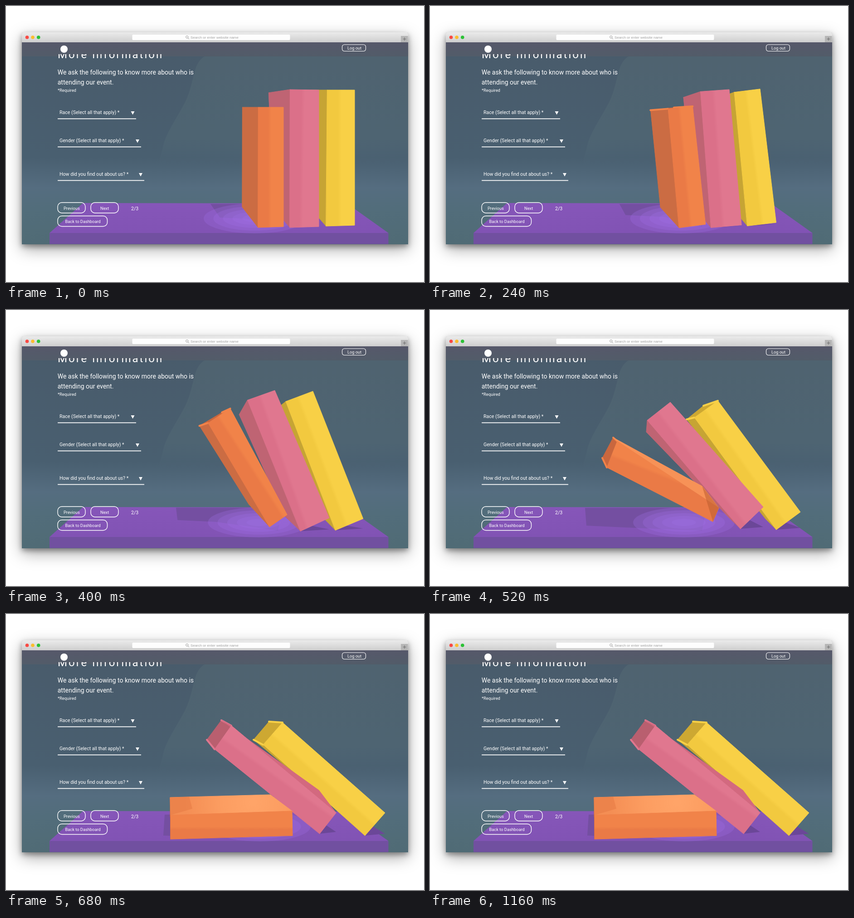
An HTML page with a canvas for the animation above (1.2 s loop, 922 by 608 pixels).

```html
<!DOCTYPE html>
<html lang="en">
<head>
<meta charset="utf-8">
<title>Falling books</title>
<style>
html, body { margin: 0; width: 100%; height: 100%; overflow: hidden; background: #fff; }
canvas { display: block; }
</style>
</head>
<body>
<canvas id="stage" width="922" height="608"></canvas>
<script>
const LOOP = 1200, STEP = 40;
const W = 922, H = 608;
const ctx = document.getElementById('stage').getContext('2d');

// Each pose lists the box corners: side top, front top-left, front top-right,
// front bottom-right, front bottom-left, side bottom, back top-right.
const books = [
  {
    front: ['#f2c93f', '#f8d046'], side: '#c6a434', top: '#cda832', right: '#f0c740',
    times: [0, 160, 320, 520, 665],
    poses: [
      [672,185, 708,185, 769,185, 769,483, 706,485, 672,446, 735,185],
      [680,186, 692,191, 745,187, 763,481, 701,483, 672,446, 735,185],
      [616,212, 644,191, 706,178, 770,470, 706,486, 668,446, 680,196],
      [566,241, 583,237, 635,200, 817,445, 764,484, 740,460, 603,211],
      [546,277, 567,288, 610,239, 836,438, 792,488, 752,447, 580,237]
    ]
  },
  {
    front: ['#db7089', '#e0778f'], side: '#bf6473', top: '#b95f6f', right: '#d3697f',
    times: [0, 160, 320, 520, 655],
    poses: [
      [579,191, 626,184, 690,185, 690,486, 626,488, 590,446, 643,192],
      [570,191, 612,189, 676,187, 685,485, 619,486, 589,446, 634,189],
      [541,214, 571,189, 634,179, 695,475, 628,490, 588,450, 604,204],
      [477,269, 479,243, 530,203, 735,434, 685,482, 660,458, 528,229],
      [443,277, 460,298, 497,246, 728,438, 692,484, 645,422, 475,234]
    ]
  },
  {
    front: ['#ea7a46', '#f18349'], side: '#cb6c43', top: '#c9673e', right: '#f79257',
    times: [0, 160, 320, 520, 600],
    poses: [
      [521,223, 556,223, 612,223, 612,486, 556,488, 521,443, 584,223],
      [503,222, 541,229, 596,226, 607,485, 550,488, 513,440, 549,220],
      [461,240, 493,227, 547,214, 612,470, 557,487, 512,444, 518,225],
      [380,326, 390,347, 413,289, 637,436, 624,466, 578,406, 404,281],
      [362,447, 363,496, 363,443, 631,434, 632,488, 572,443, 362,404]
    ]
  }
];

const shadow = {
  times: [0, 160, 320, 520, 600],
  poses: [
    [451,436, 472,466],
    [433,436, 455,465],
    [399,436, 404,458],
    [342,436, 345,475],
    [350,442, 347,488]
  ]
};

const mix = (a, b, k) => a + (b - a) * k;
const ramp = (t, a, b) => Math.min(1, Math.max(0, (t - a) / (b - a)));

// Smooth curve through keyed rows of numbers.
function sample(times, rows, t) {
  const last = times.length - 1;
  if (t >= times[last]) return rows[last].slice();
  let i = 0;
  while (t >= times[i + 1]) i++;
  const span = times[i + 1] - times[i], u = (t - times[i]) / span;
  const lo = Math.max(0, i - 1), hi = Math.min(last, i + 2);
  return rows[i].map((p, n) => {
    const q = rows[i + 1][n];
    const m0 = (q - rows[lo][n]) / (times[i + 1] - times[lo]) * span;
    const m1 = (rows[hi][n] - p) / (times[hi] - times[i]) * span;
    const d = q - p;
    return p + u * (m0 + u * (3 * d - 2 * m0 - m1 + u * (m0 + m1 - 2 * d)));
  });
}

// Corners become angle and distance around the front bottom-left foot.
function toPolar(poses) {
  const rows = [];
  for (const pose of poses) {
    const ex = pose[8], ey = pose[9], row = [];
    for (let n = 0; n < pose.length; n += 2) {
      if (n === 8) { row.push(ex, ey); continue; }
      const dx = pose[n] - ex, dy = pose[n + 1] - ey;
      let a = Math.atan2(dy, dx);
      if (rows.length) {
        const before = rows[rows.length - 1][n];
        a -= Math.round((a - before) / (2 * Math.PI)) * 2 * Math.PI;
      }
      row.push(a, Math.hypot(dx, dy));
    }
    rows.push(row);
  }
  return rows;
}

function corners(book, t) {
  const v = sample(book.times, book.polar, t), pts = [];
  for (let n = 0; n < v.length; n += 2) {
    pts.push(n === 8 ? [v[8], v[9]]
      : [v[8] + Math.cos(v[n]) * v[n + 1], v[9] + Math.sin(v[n]) * v[n + 1]]);
  }
  const [, , , d, e, f] = pts;
  pts.push([d[0] + 0.8 * (f[0] - e[0]), d[1] + 0.8 * (f[1] - e[1])]);
  return pts;
}

function area(pts) {
  return pts.reduce((sum, p, i) => {
    const q = pts[(i + 1) % pts.length];
    return sum + p[0] * q[1] - q[0] * p[1];
  }, 0) / 2;
}

function trace(c, pts) {
  c.beginPath();
  pts.forEach(p => c.lineTo(p[0], p[1]));
  c.closePath();
}

function poly(c, pts, fill) {
  trace(c, pts);
  c.fillStyle = fill;
  c.fill();
}

function face(pts, fill) {
  if (area(pts) < 1) return;
  poly(ctx, pts, fill);
  ctx.strokeStyle = fill;
  ctx.lineWidth = 1;
  ctx.stroke();
}

function line(c, a, b, color, width) {
  c.beginPath();
  c.moveTo(a[0], a[1]);
  c.lineTo(b[0], b[1]);
  c.strokeStyle = color;
  c.lineWidth = width;
  c.stroke();
}

function gradient(c, from, to, stops) {
  const g = c.createLinearGradient(from[0], from[1], to[0], to[1]);
  stops.forEach(([at, color]) => g.addColorStop(at, color));
  return g;
}

function roundBox(c, x, y, w, h, r) {
  c.beginPath();
  c.roundRect(x, y, w, h, r);
}

function dot(c, x, y, r, fill) {
  c.beginPath();
  c.arc(x, y, r, 0, 7);
  c.fillStyle = fill;
  c.fill();
}

function label(c, text, x, y, size, color = '#fff', family = 'Roboto, sans-serif') {
  c.font = `${size}px ${family}`;
  c.fillStyle = color;
  c.fillText(text, x, y);
}

function layer(paint) {
  const canvas = document.createElement('canvas');
  canvas.width = W;
  canvas.height = H;
  paint(canvas.getContext('2d'));
  return canvas;
}

function paintWindow(c) {
  c.fillStyle = '#fff';
  c.fillRect(0, 0, W, H);
  for (const [blur, drop, alpha] of [[34, 11, 0.34], [12, 5, 0.36]]) {
    c.save();
    c.shadowColor = `rgba(0,0,0,${alpha})`;
    c.shadowBlur = blur;
    c.shadowOffsetY = drop;
    c.fillStyle = '#ccc';
    roundBox(c, 35, 58, 852, 467, [4, 4, 0, 0]);
    c.fill();
    c.restore();
  }
  c.fillStyle = gradient(c, [0, 58], [0, 80], [[0, '#ebebeb'], [1, '#cecece']]);
  roundBox(c, 35, 58, 852, 24, [4, 4, 0, 0]);
  c.fill();
  dot(c, 46.5, 69, 3.8, '#f94943');
  dot(c, 59, 69, 3.8, '#fbbd2e');
  dot(c, 71.7, 69, 3.8, '#2bc136');
  c.fillStyle = '#fdfdfd';
  roundBox(c, 278.5, 63, 348, 12, 2);
  c.fill();
  c.strokeStyle = '#8c8c8c';
  c.lineWidth = 0.9;
  c.beginPath();
  c.arc(399.3, 68.3, 2.6, 0, 7);
  c.stroke();
  line(c, [401.2, 70.2], [404, 73], '#8c8c8c', 1);
  label(c, 'Search or enter website name', 407, 72, 7.95, '#a0a0a0',
    '"Liberation Sans", Arial, sans-serif');
  c.fillStyle = '#b5b5b5';
  c.fillRect(871, 66, 15.5, 14);
  line(c, [875.5, 72.8], [882.5, 72.8], '#666', 1);
  line(c, [879, 69.3], [879, 76.3], '#666', 1);

  c.fillStyle = gradient(c, [0, 80], [0, 525], [
    [0, '#495b6b'], [0.57, '#495f70'], [0.72, '#556d80'], [0.82, '#526d7b'], [1, '#506b75']]);
  c.fillRect(35, 80, 852, 445);
  c.beginPath();
  c.moveTo(440, 110);
  c.bezierCurveTo(410, 125, 418, 165, 395, 212);
  c.bezierCurveTo(372, 255, 350, 285, 346, 312);
  c.lineTo(335, 350);
  c.lineTo(887, 350);
  c.lineTo(887, 110);
  c.fillStyle = gradient(c, [0, 110], [0, 350], [
    [0, '#4f6370'], [0.75, '#4e6472'], [1, 'rgba(78,102,118,0)']]);
  c.fill();
  c.fillStyle = gradient(c, [0, 80], [0, 111], [[0, '#56586a'], [1, '#525c69']]);
  c.fillRect(35, 80, 852, 31);

  poly(c, [[170, 434], [752, 435], [843.5, 500], [96, 500]],
    gradient(c, [0, 434], [0, 500], [[0, '#8656b9'], [1, '#8153b4']]));
  c.fillStyle = '#7150a0';
  c.fillRect(96, 500, 747.5, 24.5);
}

function paintForm(c) {
  dot(c, 128, 95, 8, '#fff');
  c.lineWidth = 1.1;
  c.strokeStyle = '#fff';
  roundBox(c, 741.5, 85, 52, 14.5, 5);
  c.stroke();
  label(c, 'Log out', 753, 95.6, 9.2);

  c.save();
  c.beginPath();
  c.rect(100, 106, 300, 20);
  c.clip();
  c.letterSpacing = '3px';
  label(c, 'More information', 114, 115, 24);
  c.restore();

  label(c, 'We ask the following to know more about who is', 113.7, 151, 14);
  label(c, 'attending our event.', 113.7, 172.5, 14);
  label(c, '*Required', 114, 189, 9.4);

  const fields = [
    ['Race (Select all that apply) *', 238, 287, 279.5],
    ['Gender (Select all that apply) *', 300, 298, 290],
    ['How did you find out about us? *', 374, 305, 297]
  ];
  for (const [text, y, end, tip] of fields) {
    label(c, text, 118, y, 10.6);
    line(c, [114, y + 10.3], [end, y + 10.3], '#fff', 1.8);
    poly(c, [[tip - 4, y - 6], [tip + 4, y - 6], [tip, y + 1.5]], '#fff');
  }

  const buttons = [
    ['Previous', 114, 433, 61, 127],
    ['Next', 187, 433, 61, 208],
    ['Back to Dashboard', 114, 462.5, 109.5, 130.5]
  ];
  for (const [text, x, y, w, tx] of buttons) {
    c.lineWidth = 1.4;
    c.strokeStyle = '#fff';
    roundBox(c, x, y, w, 23, 9);
    c.stroke();
    label(c, text, tx, y + 15.6, 9.3);
  }
  label(c, '2/3', 276, 449.5, 10.6);
}

function drawFloor(t) {
  const [x, y, x2, y2] = sample(shadow.times, shadow.poses, t);
  poly(ctx, [[x, y], [610, 436], [600, 486], [x2 + 85, y2 + 4], [x2, y2]], '#744fa1');
  const cx = mix(548, 560, ramp(t, 0, 520));
  for (let i = 0; i < 5; i++) {
    const k = 1 - i * 0.19;
    ctx.beginPath();
    ctx.ellipse(cx, 468, 112 * k, 33 * k, 0, 0, 7);
    ctx.fillStyle = 'rgba(158,110,228,0.27)';
    ctx.fill();
  }
}

function drawContact(pts) {
  const d = pts[3], e = pts[4];
  if (e[1] - d[1] < 5) return;
  poly(ctx, [e, [mix(e[0], d[0], 0.4), mix(e[1], d[1], 0.4)], [d[0], e[1] - 4]], '#6b4798');
}

function drawBook(book, pts, t) {
  const [a, b, c, d, e, f, g, h] = pts;
  const orange = book === books[2];
  const landed = orange ? ramp(t, 520, 600) : 0;
  ctx.lineJoin = ctx.lineCap = 'round';
  face([a, b, e, f], book.side);

  const top = [a, g, c, b];
  if (area(top) > 30) {
    face(top, book.top);
    if (!landed) {
      line(ctx, a, b, book.front[1], 4);
      line(ctx, g, c, book.front[1], 4);
    }
  }

  let lid = book.right;
  if (landed) {
    lid = ctx.createRadialGradient(545, 415, 5, 545, 415, 150);
    lid.addColorStop(0, '#ffa468');
    lid.addColorStop(0.45, '#fc9d61');
    lid.addColorStop(1, '#f48e54');
  }
  face([c, g, h, d], lid);
  if (landed === 1) poly(ctx, [g, [404, 402.5], [411, 429], c], 'rgba(226,118,66,0.45)');

  face([b, c, d, e], gradient(ctx, b, c, [
    [0, book.front[0]], [0.4, book.front[0]], [0.52, book.front[1]], [1, book.front[1]]]));

  if (orange) {
    ctx.globalAlpha = 0.5 * ramp(t, 400, 520) * (1 - landed);
    if (ctx.globalAlpha) poly(ctx, [h, d, e], '#b95a2c');
    ctx.globalAlpha = 1;
  }
}

for (const book of books) book.polar = toPolar(book.poses);
const backdrop = layer(paintWindow);
const form = layer(paintForm);

function draw(t) {
  ctx.drawImage(backdrop, 0, 0);
  drawFloor(t);
  const shapes = books.map(book => corners(book, t));
  shapes.slice(0, 2).forEach(drawContact);
  books.forEach((book, i) => drawBook(book, shapes[i], t));
  ctx.drawImage(form, 0, 0);
}

function tick() {
  draw(Math.floor(performance.now() % LOOP / STEP) * STEP);
  requestAnimationFrame(tick);
}
tick();
</script>
</body>
</html>
```
